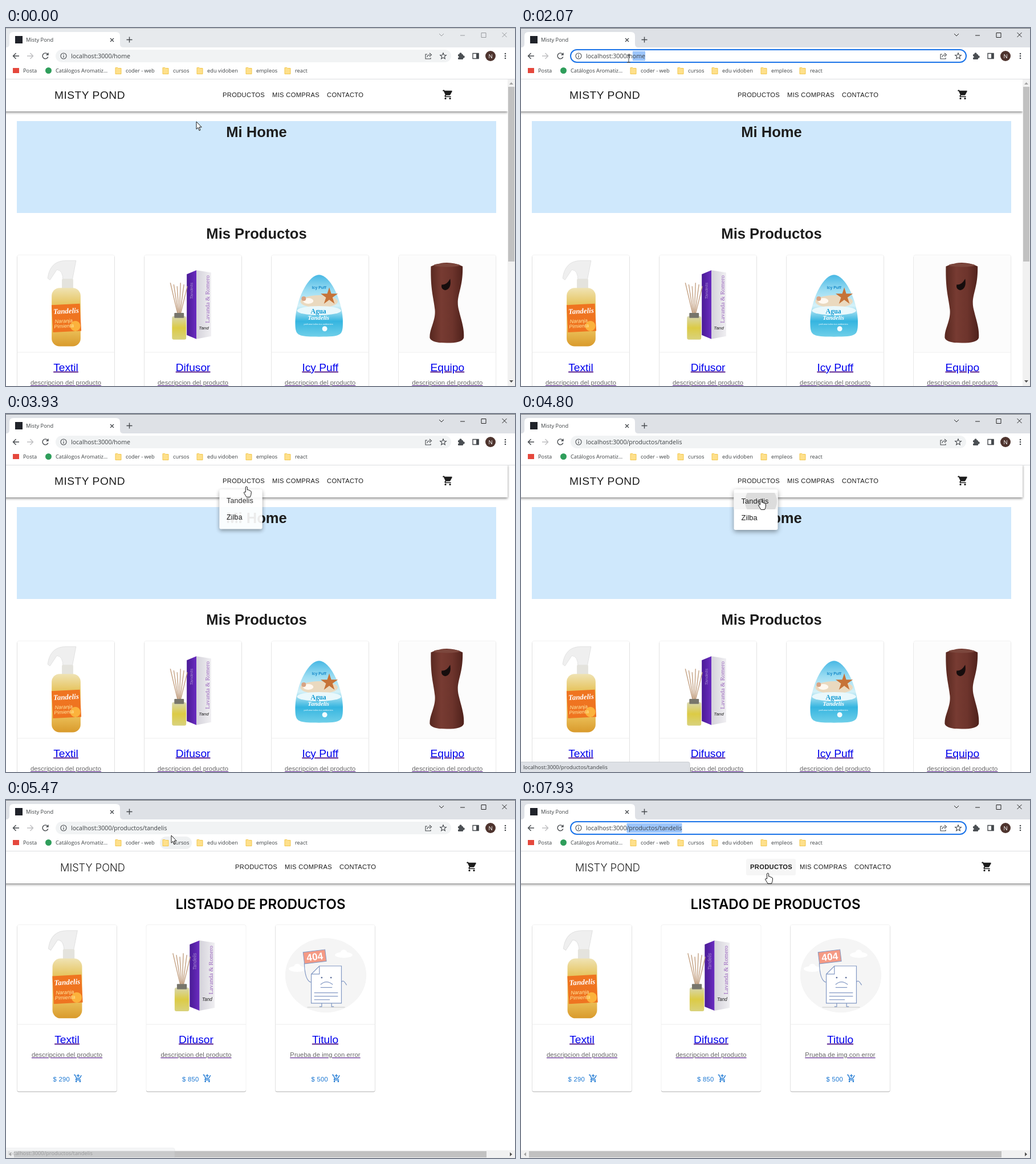
An HTML page for the animation above (8 s loop, 893x627 px).

```html
<!DOCTYPE html>
<html lang="es">
<head>
<meta charset="utf-8">
<title>Misty Pond</title>
<style>
html, body { margin: 0; width: 100%; height: 100%; overflow: hidden; background: #fff }
svg { display: block; width: 893px; height: 627px; font-family: 'Liberation Sans', Arial, sans-serif; fill: #1d1d1d }
text { white-space: pre }
.ui { font-family: 'Open Sans', 'Noto Sans', sans-serif; fill: #3c4043 }
.mid { text-anchor: middle }
.btn { letter-spacing: .32px }
.body { letter-spacing: .12px }
.line { fill: none; stroke: #45494d; stroke-width: 1.4 }
.thin { stroke-width: 1.1 }
.ink { stroke: #8399c4; stroke-width: 1.2 }
.link { fill: #551a8b; text-decoration: underline }
.poppy { font-family: Inter, sans-serif }
.brand { font: italic bold 11px 'Liberation Serif', serif; fill: #fff }
.header { filter: drop-shadow(0 2px 2px #0007) }
.card { fill: #fff; stroke: #0000000d; filter: drop-shadow(0 1px .7px #0004) }
.paper { fill: #fff; filter: drop-shadow(0 3px 4px #0006) }
</style>
</head>
<body>
<svg id="stage" viewBox="0 0 893 627"></svg>
<script>
const text = (x, y, str, size, attrs = '') =>
  `<text x="${x}" y="${y}" font-size="${size}" ${attrs}>${str}</text>`;
const rect = (x, y, w, h, fill, attrs = '') =>
  `<rect x="${x}" y="${y}" width="${w}" height="${h}" fill="${fill}" ${attrs}/>`;
const path = (d, fill, attrs = '') => `<path d="${d}" fill="${fill}" ${attrs}/>`;
const line = (d, cls = '', attrs = '') => `<path class="line ${cls}" d="${d}" ${attrs}/>`;
const oval = (x, y, rx, ry, fill, attrs = '') => `<ellipse cx="${x}" cy="${y}" rx="${rx}" ry="${ry}" fill="${fill}" ${attrs}/>`;
const circle = (x, y, r, fill, attrs = '') => `<circle cx="${x}" cy="${y}" r="${r}" fill="${fill}" ${attrs}/>`;
const at = (x, y, body, scale = 1, angle = 0) =>
  `<g transform="translate(${x} ${y}) rotate(${angle}) scale(${scale})">${body}</g>`;
const repeat = (n, make) => Array.from({ length: n }, (_, i) => make(i)).join('');
const star = (x, y, r, inner) => 'M' + repeat(10, i => {
  const a = i * Math.PI / 5, d = i % 2 ? inner : r;
  return `${x + d * Math.sin(a)} ${y - d * Math.cos(a)} `;
}) + 'Z';
const gradient = (id, dir, ...colors) => `<linearGradient id="${id}" ${dir}>` +
  colors.map((c, i) => `<stop offset="${i / (colors.length - 1)}" stop-color="${c}"/>`).join('') + '</linearGradient>';

const wheels = circle(7, 20, 2, 'inherit') + circle(17, 20, 2, 'inherit');
const cart = path('M1 2v2h2l3.6 7.6-1.4 2.4c-.7 1.4.3 3 1.8 3h12v-2H7.4l1-2h7.4q1.2 0 1.8-1l4-7.5q.4-1.5-1-1.5H5.2l-1-2z') + wheels;
const addCart = '<g fill="none" stroke="#1976d2" stroke-width="2"><path d="M1 3h2.6L8 12h8l4.5-8M7.5 12 6 15q0 1 1 1h12M12 1v8M8 5h8"/></g>' +
  `<g fill="#1976d2">${wheels}</g>`;

// Product pictures, each in a 172 px square
const spray =
  path('M54 41Q58 10 86 10H104L97 46H81Q81 26 70 26L58 44Z', '#efefef', 'stroke="#e2e2e2"') +
  rect(79, 42, 20, 24, '#e4e3dd', 'rx="2"') + rect(61, 58, 51, 103, 'url(#amber)', 'rx="14"') +
  at(87, 111, rect(-25, -24, 50, 48, '#ef7420') + circle(15, 15, 9, '#fbb23c') +
    text(0, -8, 'Tandelis', 12, 'class="brand mid" style="font-size:13px"') +
    repeat(2, i => text(-5, 8 + i * 9, ['Naranja', 'Pimienta'][i], 9, 'class="mid" fill="#ffe9a0" font-style="italic"')), 1, -3);

const diffuser =
  path('M75 34 92 27V148L75 141Z', 'url(#violet)') + path('M92 27 118 31V143L92 148Z', 'url(#silver)') +
  at(115, 120, text(0, 0, 'Lavanda &amp; Romero', 10.6, 'fill="#9a66bd" font-family="Liberation Serif, serif"') +
    text(42, -29, 'Tandelis', 8, 'fill="#a48ad0" font-style="italic"'), 1, -90) +
  text(105, 131, 'Tand', 8, 'class="mid" font-style="italic"') +
  repeat(6, i => line(`M${59 + i} 104 ${46 + i * 6} ${49 + i % 3 * 3}`, '', 'style="stroke:#c4a284"')) +
  rect(49, 108, 25, 41, 'url(#oil)', 'rx="3"') + rect(53, 102, 17, 9, '#77756b', 'rx="1"');

const sachet =
  path('M84 35C104 35 126 82 126 118 126 142 124 144 84 144S42 142 42 118C42 82 64 35 84 35Z', 'url(#sea)') +
  oval(84, 82, 33, 11, '#ead9bf') + path(star(102, 73, 16, 6), '#c67338') +
  oval(65, 81, 9, 5, '#fff8f0') + circle(57, 77, 4, '#d7a384') + oval(84, 98, 39, 8, '#e9f8fc') +
  text(84, 60, 'Icy Puff', 7, 'class="mid" fill="#1488c8" font-weight="bold"') +
  text(83, 103, 'Agua', 12, 'class="mid" fill="#1198d0" font-weight="bold" font-family="Liberation Serif, serif"') +
  text(83, 114, 'Tandelis', 11, 'class="brand mid"') +
  text(83, 123, 'perfuma todos tus ambientes', 4, 'class="mid" style="fill:#fff"') + circle(94, 130, 4.5, '#f3fcff');

const dispenser = rect(1, 1, 170, 169, '#fcfcfc') +
  path('M57 20Q85 7 113 20C114 62 100 72 106 96S116 130 115 146Q112 155 85 155T55 146C54 130 66 116 64 96S56 62 57 20Z', 'url(#brown)') +
  oval(85, 18, 23, 3, '#7c473d') + path('M91 42Q94 60 82 62 74 60 76 52 84 54 91 42Z', '#160d0d');

const missing = oval(87, 87, 70, 64, '#f5f5f5') +
  [[38, 76], [118, 52]].map(([x, y]) => oval(x, y, 15, 5, '#fff') + circle(x, y - 3, 6, '#fff')).join('') +
  line('M50 66Q51 97 62 99M114 99Q117 93 123 104M80 135V141H76M97 135V141H101', 'ink') +
  at(68, 55, rect(-19, -10, 38, 20, '#f59a84', 'stroke="#8399c4"') +
    text(0, 6, '404', 17, 'class="mid" style="fill:#fff" font-weight="bold"'), 1, -7) +
  path('M76 71H114V135H62V85Z', '#fff') + line('M76 71H114V135H62V85ZM76 71V85H62M78 103Q88 94 99 103M78 108H98', 'ink') +
  repeat(3, i => line(`M67 ${117 + i * 6}h${i < 2 ? 41 : 27}`, 'ink')) +
  repeat(2, i => circle(80 + i * 16, 91, 1.4, '#60739e')) + line('M55 142H120', 'thin', 'opacity=".25"');

function card(x, y, w, h, picture, title, note, price) {
  const link = (dy, str, size, fill, cls = '') => text(x + w / 2, y + w + dy,
    `<tspan fill="${fill}">${str}</tspan>`, size, `class="link mid ${cls}"`);
  return rect(x, y, w, h, '#fff', 'class="card" rx="3"') + at(x, y, picture, w / 172) +
    rect(x, y + w - 1, w, 1, '#eee') + link(32, title, 19.2, '#0000ee') + link(56.5, note, 11.2, '#666', 'body') +
    (price ? text(x + 63, y + w + 99, '$ ' + price, 11.2, 'class="btn" fill="#1976d2"') + at(x + 99, y + w + 86, addCart, .67) : '');
}

function header(w, title, navX, cartX) {
  return rect(-5, 88, w + 5, 58, '#fff', 'class="header"') + title +
    rect(navX - 7, 103, 87, 29, '#f6f6f6', 'rx="3" class="navHover"') +
    text(navX, 121, 'PRODUCTOS', 11.2, 'class="btn products"') +
    text(navX + 87, 121, 'MIS COMPRAS', 11.2, 'class="btn"') +
    text(navX + 183, 121, 'CONTACTO', 11.2, 'class="btn"') + at(cartX, 107.4, cart, .8);
}

const scrollArrow = (x, y, angle, fill) => at(x, y, path('M-3.5 2 0-2 3.5 2Z', fill), 1, angle);
const note = 'descripcion del producto';
const home = rect(19, 163, 841, 161, '#cfe8fc') +
  text(439.5, 190.5, 'Mi Home', 25.6, 'class="mid" font-weight="bold"') +
  text(439.5, 368.5, 'Mis Productos', 25.6, 'class="mid" font-weight="bold"') +
  [[spray, 'Textil'], [diffuser, 'Difusor'], [sachet, 'Icy Puff'], [dispenser, 'Equipo']]
    .map(([pic, name], i) => card(19.5 + i * 223.1, 397.5, 171, 290, pic, name, note)).join('') +
  header(880, text(85, 123.5, 'MISTY POND', 19.2, 'letter-spacing=".5"'), 380, 765.4) +
  `<g id="scrollbar">${rect(880, 90, 13, 537, '#f1f1f1') + rect(881, 103, 11, 306, '#c1c1c1') +
  scrollArrow(886.5, 97, 0, '#a3a3a3') + scrollArrow(886.5, 619, 180, '#505050')}</g>`;

const listing =
  text(446.5, 190.5, 'LISTADO DE PRODUCTOS', 24, 'class="mid poppy" font-weight="600" style="fill:#000"') +
  [[spray, 'Textil', note, 290], [diffuser, 'Difusor', note, 850], [missing, 'Titulo', 'Prueba de img con error', 500]]
    .map((item, i) => card(19.5 + i * 226.5, 218.5, 175, 292, ...item)).join('') +
  header(900, text(95, 124.5, 'MISTY POND', 18.2, 'class="poppy" font-weight="300"'), 402, 807.4) +
  rect(0, 613.5, 893, 14, '#f1f1f1') + rect(14, 615, 829, 11, '#c1c1c1') +
  scrollArrow(7, 620.5, -90, '#a3a3a3') + scrollArrow(886, 620.5, 90, '#505050');

const bookmark = (x, str) => text(x, 78, str, 9.3, 'class="ui"');
const folder = (x, str) => path(`M${x} 69.5h4l1 1h5v10h-10z`, '#fee08b', 'stroke="#f2c74f"') + bookmark(x + 18, str);
const navArrow = (x, angle, opacity) => at(x, 49, line('M5.5 0H-5M0-5-5 0 0 5', '', `opacity="${opacity}"`), 1, angle);
const chrome = rect(0, 0, 893, 90, '#fff') + rect(0, 0, 893, 34, '', 'id="strip"') + rect(0, 0, 893, 1, '', 'id="edge"') +
  path('M0 34q6 0 6-6V14q0-7 7-7H193q7 0 7 7V28q0 6 6 6Z', '#fff') +
  rect(16, 14, 13, 13, '#20232a') + text(35, 24, 'Misty Pond', 9.3, 'class="ui"') +
  at(186, 21, line('M-3-3 3 3M3-3-3 3')) + at(216.5, 20.5, line('M-5 0H5M0-5V5')) +
  `<g id="controls" fill="none">${at(764, 12, '<path d="M-4-2 0 2 4-2"/>') + at(801, 13, '<path d="M-4 0H4"/>') +
    at(838, 12.5, '<path d="M-4-4H4V4H-4Z"/>') + at(874.5, 12, '<path d="M-4-4 4 4M4-4-4 4"/>')}</g>` +
  navArrow(17.5, 0, 1) + navArrow(42.5, 180, .35) +
  at(69, 49, line('M4.2-3A5 5 0 1 0 4.8 1.5M5-5.5V-2H1.5')) +
  rect(87, 38, 694, 22, '', 'id="bar" rx="11"') + rect(0, 40.5, 0, 17, '#9cc5fb', 'id="selection"') +
  at(101, 49, circle(0, 0, 5, 'none', 'class="line thin"') + line('M0-1V3M0-3.2V-2', 'thin')) +
  text(114, 53, '', 10.6, 'class="ui" id="url"') +
  at(741, 49, line('M-2-3H-5V5H4V3M-2 2Q-2-2 3-2M2-5 5.5-2 2 1', 'thin')) +
  line(star(767, 49.3, 5.6, 2.5), 'thin') +
  at(798, 49.5, rect(-5, -3.5, 9, 9, '#4b4f53', 'rx="1"') + circle(-.5, -4, 2.2, '#4b4f53') +
    circle(4.5, 1, 2.2, '#4b4f53') + circle(-5, 1, 1.6, '#fff')) +
  line('M819 44.5H829V53.5H819Z') + rect(825, 44.5, 4.5, 9, '#45494d') +
  circle(850, 49, 9, '#4e342e') + text(850, 52.5, 'N', 9.5, 'class="ui mid" style="fill:#fff"') +
  repeat(3, i => circle(876, 45 + i * 4, 1.3, '#45494d')) +
  rect(270, 64, 56, 22, '#eff1f2', 'id="folderHover" rx="11"') +
  rect(12, 70, 11, 9, '#e5483d') + bookmark(30, 'Posta') + circle(74.5, 74.5, 5.5, '#2f9e5b') + bookmark(87, 'Catálogos Aromatiz...') +
  folder(192, 'coder - web') + folder(275, 'cursos') + folder(335, 'edu vidoben') + folder(421, 'empleos') + folder(489, 'react') +
  rect(0, 89, 893, 1, '#dcdee1');

const menu = rect(373.5, 132, 77, 71, '#fff', 'class="paper" rx="3"') +
  rect(373.5, 138, 77, 29, '#f5f5f5', 'id="itemHover"') +
  `<g clip-path="url(#item)">${circle(421, 153, 0, '#0000001a', 'id="ripple"')}</g>` +
  text(386.5, 157, 'Tandelis', 12.8, 'class="body"') + text(386.5, 186, 'Zilba', 12.8, 'class="body"');

const status = rect(-4, 609.5, 300, 22, '#dee1e6', 'rx="3" stroke="#c9ccd1"') +
  text(4, 622, 'localhost:3000/productos/tandelis', 9.3, 'class="ui"');

const pointers = {
  arrow: path('M0 0V13.2L3 10.4 5 15.6 7 14.7 5 9.7H9.2Z', '#fff', 'stroke="#000" stroke-width=".9"'),
  beam: line('M-3-6.5H3M0-6.5V6.5M-3 6.5H3', 'thin'),
  hand: path('M-1.5 10V1q1.5-2 3 0v5q2.5-1 3 1 2-.5 2.5 1 1.5 0 1.5 2 0 5-2 8.5H0L-4.5 11q0-2 3-1Z', '#fff', 'stroke="#000" stroke-width=".9"')
};

const down = 'x2="0" y2="1"';
const stage = document.getElementById('stage');
stage.innerHTML = '<defs>' +
  gradient('amber', down, '#efe3b4', '#e5bf50', '#eec660', '#d99a2c') +
  gradient('violet', '', '#4a1b96', '#6a2cc0') + gradient('silver', '', '#d4d2da', '#f0eff2') +
  gradient('oil', down, '#d8d7b0', '#dccb45', '#d9d27c') +
  gradient('sea', down, '#48b8e4', '#9adcf2', '#d5f1f8', '#35b5e0', '#6fcfe9') +
  gradient('brown', '', '#56271f', '#773b32', '#6d342c', '#4e211b') +
  `<clipPath id="item">${rect(373.5, 138, 77, 29)}</clipPath></defs>` +
  `<g id="home">${home}</g><g id="listing">${listing}</g>${chrome}<g id="menu">${menu}</g><g id="status">${status}</g>` +
  `<g id="pointer">${Object.entries(pointers).map(([id, shape]) => `<g id="${id}">${shape}</g>`).join('')}</g>`;

const el = id => document.getElementById(id);
const show = (id, visible) => el(id).style.display = visible ? '' : 'none';
const ramp = (t, from, length) => Math.min(1, Math.max(0, (t - from) / length));
const ease = k => k * k * (3 - 2 * k);

// Each pointer move: start, end, where to
const moves = [
  { from: 530, to: 1330, x: 228, y: 50 },   // to the address
  { from: 1500, to: 2130, x: 188, y: 54 },  // select its path
  { from: 2270, to: 2730, x: 396, y: 192 },
  { from: 2730, to: 3000, x: 393, y: 174 },
  { from: 3000, to: 3470, x: 422, y: 122 }, // to the nav button
  { from: 3730, to: 4470, x: 421, y: 149 }, // to the menu item
  { from: 4870, to: 5470, x: 290, y: 62 },
  { from: 5530, to: 5700, x: 289, y: 49 },
  { from: 5800, to: 6400, x: 201, y: 53 },  // select the path again
  { from: 6400, to: 6800, x: 189, y: 56 },
  { from: 7130, to: 7930, x: 433, y: 128 }
];
const pointerAt = t => moves.reduce(([x, y], m) => {
  const k = ease(ramp(t, m.from, m.to - m.from));
  return [x + (m.x - x) * k, y + (m.y - y) * k];
}, [334, 164]);

function drawUrl(t, x, focused, barHover) {
  const url = el('url'), selection = el('selection'), bar = el('bar');
  url.textContent = 'localhost:3000/' + (t < 4790 ? 'home' : 'productos/tandelis');
  const length = url.textContent.length, end = url.getEndPositionOfChar(length - 1).x;
  const edge = i => i < length ? url.getStartPositionOfChar(i).x : end;
  const dragging = t < 2130 || (t > 5700 && t < 6560);
  let first = 14;
  while (dragging && first < length && edge(first) < x + 4) first++;
  selection.setAttribute('x', edge(first));
  selection.setAttribute('width', focused ? end - edge(first) : 0);
  bar.setAttribute('fill', focused ? '#fff' : barHover ? '#e8eaed' : '#f1f3f4');
  bar.setAttribute('stroke', focused ? '#1a73e8' : 'none');
  bar.setAttribute('stroke-width', 2);
}

function draw(now) {
  const t = now % 8000, [x, y] = pointerAt(t);
  const onListing = t >= 4870, menuOpen = t >= 3730 && t < 4870, active = t >= 1470;
  const focused = (active && t < 3730) || t >= 5730;
  const inside = (left, top, right, bottom) => x >= left && x <= right && y >= top && y <= bottom;
  const navX = onListing ? 395 : 373;
  const navHover = !menuOpen && inside(navX, 103, navX + 87, 132);
  const barHover = inside(86, 38, 781, 60);

  show('home', !onListing);
  show('listing', onListing);
  show('scrollbar', t < 3730);
  el('strip').setAttribute('fill', active ? '#dee1e6' : '#e7eaed');
  el('edge').setAttribute('fill', active ? '#72767c' : '#b9bcc0');
  el('controls').setAttribute('stroke', active ? '#222' : '#96999d');
  drawUrl(t, x, focused, barHover);
  show('folderHover', t > 5400 && t < 5560);
  stage.querySelectorAll('.navHover').forEach(e => e.style.display = navHover ? '' : 'none');
  stage.querySelectorAll('.products').forEach(e => e.setAttribute('font-weight', navHover ? 'bold' : 'normal'));

  const grow = ramp(t, 3730, 220), scale = .75 + .25 * grow;
  el('menu').setAttribute('opacity', grow * (1 - ramp(t, 4870, 200)));
  el('menu').setAttribute('transform', `translate(412 132) scale(${scale}) translate(-412 -132)`);
  show('itemHover', inside(373, 138, 451, 167));
  el('ripple').setAttribute('r', t < 4700 ? 0 : 10 + 45 * ramp(t, 4700, 250));
  el('status').setAttribute('opacity', t < 4670 ? 0 : 1 - ramp(t, 5330, 200));

  const onHeading = !onListing && !menuOpen && inside(386, 165, 493, 200);
  const kind = barHover || onHeading ? 'beam' : navHover || menuOpen ? 'hand' : 'arrow';
  for (const id in pointers) show(id, id === kind);
  el('pointer').setAttribute('transform', `translate(${x} ${y})`);
  requestAnimationFrame(draw);
}
requestAnimationFrame(draw);
</script>
</body>
</html>
```
